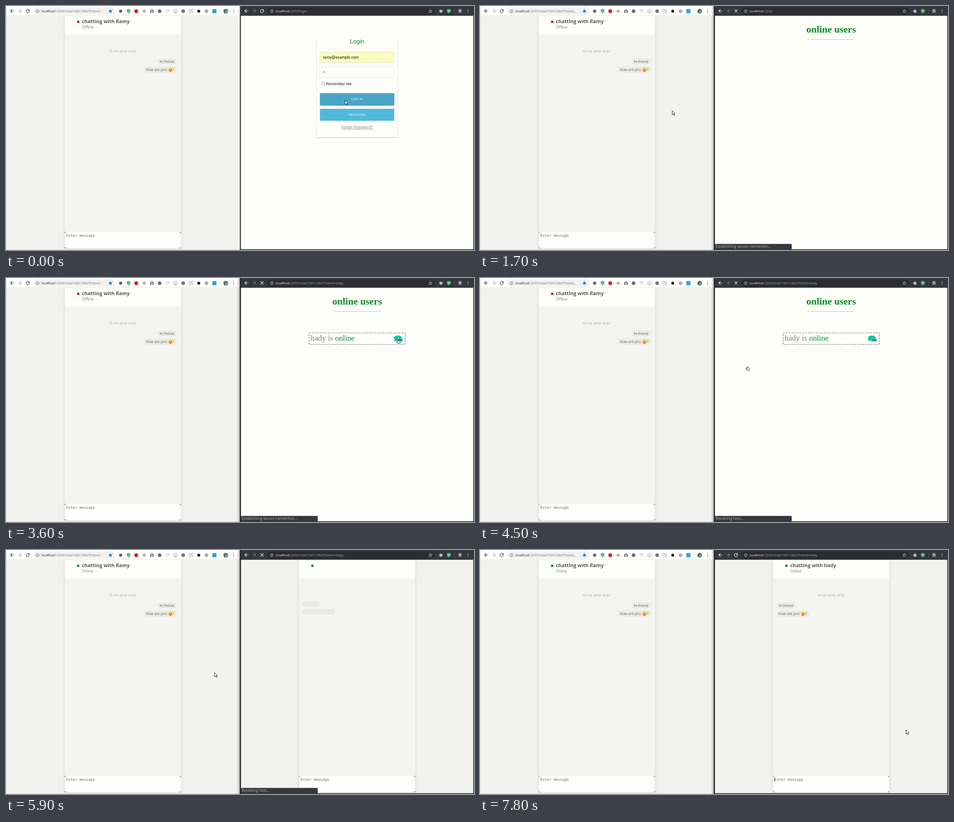
Write an HTML page that moves like this. It is 1033x542 px and loops after 8 s.

```html
<!DOCTYPE html>
<html lang="en">
<head>
<meta charset="utf-8">
<title>Two-window chat</title>
<style>
  html, body { margin: 0; width: 100%; height: 100%; overflow: hidden; background: #fefefb; }
  svg { display: block; width: 100vw; height: 100vh; }
  text { white-space: pre; }
  .ui { font-family: "Noto Sans", sans-serif; }
  .open { font-family: "Open Sans", sans-serif; }
  .sans { font-family: "Liberation Sans", Arial, sans-serif; }
  .serif { font-family: "Liberation Serif", serif; }
  .mono { font-family: "DejaVu Sans Mono", monospace; }
  .panel { filter: drop-shadow(0 0 4px #0000001a); }
  .card { filter: drop-shadow(0 1px 1px #0004); }
  .line { fill: none; stroke-linecap: round; stroke-linejoin: round; }
</style>
</head>
<body>
<svg id="stage" viewBox="0 0 1033 542"></svg>
<script>
const PAPER = '#fefefb', GREEN = '#0c8a25', RED = '#cb1528';

const rect = (x, y, w, h, fill, extra = '') =>
  `<rect x="${x}" y="${y}" width="${w}" height="${h}" fill="${fill}" ${extra}/>`;
const circle = (x, y, r, fill, extra = '') =>
  `<circle cx="${x}" cy="${y}" r="${r}" fill="${fill}" ${extra}/>`;
const text = (x, y, size, font, fill, content, extra = '') =>
  `<text x="${x}" y="${y}" font-size="${size}" class="${font}" fill="${fill}" ${extra}>${content}</text>`;
const line = (d, color, width = 1, extra = '') =>
  `<path class="line" d="${d}" stroke="${color}" stroke-width="${width}" ${extra}/>`;
const group = (id, content, extra = '') => `<g id="${id}" ${extra}>${content}</g>`;
const middle = 'text-anchor="middle"';

const shield = (x, fill) =>
  `<path d="M${x - 4} 8L${x} 6.5 ${x + 4} 8V11Q${x + 4} 14 ${x} 16 ${x - 4} 14 ${x - 4} 11Z" fill="${fill}"/>` +
  line(`M${x - 1.8} 10.8L${x - .3} 12.2 ${x + 2} 9.5`, '#fff', .9);
const star = (x, fill, stroke) => {
  const points = Array.from({ length: 10 }, (_, i) => {
    const a = i * Math.PI / 5, r = i % 2 ? 1.8 : 4;
    return `${x + r * Math.sin(a)},${11.5 - r * Math.cos(a)}`;
  });
  return `<polygon points="${points.join(' ')}" fill="${fill}" stroke="${stroke}" stroke-width=".8"/>`;
};
const menu = (x, fill) => [8, 11, 14].map(y => circle(x, y, .85, fill)).join('');
const reload = (x, color) =>
  line(`M${x + 2.6} 9A3.5 3.5 0 1 0 ${x + 3.4} 12`, color, 1.2) +
  `<path d="M${x + 4} 7V10.7H${x + .4}Z" fill="${color}"/>`;
const navigation = (x, color, faded) =>
  line(`M${x + 4} 11H${x - 3.5}M${x} 7.5L${x - 3.5} 11 ${x} 14.5`, color, 1.2) +
  line(`M${x + 13} 11H${x + 20.5}M${x + 17} 7.5L${x + 20.5} 11 ${x + 17} 14.5`, faded, 1.2);
const info = (x, color) => circle(x, 11.5, 3.3, 'none', `stroke="${color}" stroke-width=".9"`) +
  line(`M${x} 11.2V13M${x} 9.7V9.8`, color, .9);

function leftBar() {
  const dot = (x, fill, r = 3.6) => circle(x, 11.5, r, fill);
  const ring = x => circle(x, 11.5, 4, 'none', 'stroke="#999" stroke-width=".9"');
  return rect(0, 0, 516, 21.5, PAPER) + rect(0, 21, 516, .7, '#dededb') +
    navigation(13.5, '#454545', '#b8b8b6') + reload(48, '#454545') +
    rect(60, 3, 181, 16.5, '#f1f2ee', 'rx="8.2"') + info(69.5, '#666') +
    text(78, 14, 7.4, 'ui', '#777', '<tspan fill="#303030">localhost</tspan>:3333/chat/10011002?friend…') +
    star(230.5, '#1b80d8', '#1b80d8') +
    dot(253, '#686868') + shield(270.5, '#45b96b') + dot(287.5, '#d3202c', 4.3) +
    dot(305, '#b5b5b3') +
    rect(318, 9, 8.5, 6, '#888', 'rx="1"') + rect(320.5, 7.5, 3.5, 2, '#888') + circle(322.2, 12, 1.6, '#ddd') +
    dot(339, '#707070', 4) + line('M353 9L355 8 356.5 9.5 358 8 360 9 360 11 356.5 14.5 353 11Z', '#999', .8) +
    ring(374) + text(374, 13.5, 5.5, 'ui', '#888', '{}', middle) +
    circle(391, 11.5, 3.2, '#555', 'stroke="#555" stroke-width="1.8" stroke-dasharray="1.5 1"') + circle(391, 11.5, 1.2, '#ddd') +
    rect(404, 7.5, 8.5, 8, '#e6e6e3', 'stroke="#bbb" stroke-width=".6"') + line('M404 10H412.5M404 12.7H412.5', '#bbb', .5) +
    dot(425.5, '#181818', 3.2) + dot(442.5, '#aaa', 4) + rect(455.5, 7, 9, 9, '#26a3df') +
    rect(473, 6, .7, 11, '#ccc') + dot(485, '#527b5d', 5.3) + circle(487, 13, 2.6, '#8fa28b') + menu(502.5, '#444');
}

function rightBar() {
  return rect(517, 0, 516, 21.7, '#35383b') +
    rect(577, 3, 370, 16.5, '#2a2c2f', 'rx="8.2"') + navigation(530.5, '#e5e5e5', '#777b7e') +
    group('reload', reload(565, '#e5e5e5')) + group('stop', line('M562 8L568 14M568 8L562 14', '#eee', 1.2)) +
    info(586.5, '#d0d0d0') +
    text(595, 14, 7.4, 'ui', '#999da0', '<tspan fill="#dededb">localhost</tspan>:3333<tspan id="path"></tspan>') +
    star(937, 'none', '#ddd') + circle(960, 11.5, 3.6, '#b9bbbd') +
    shield(977.5, '#888') + group('shield', shield(977.5, '#45b96b')) + rect(990, 6, .7, 11, '#666') +
    line('M999 10.5H1005M1000 8H1004', '#ddd', 1.5) +
    circle(1000.2, 13.4, 1.3, 'none', 'stroke="#ddd"') + circle(1003.8, 13.4, 1.3, 'none', 'stroke="#ddd"') +
    menu(1020, '#ddd');
}

const emoji = (x, y) => circle(x, y, 4.6, '#f8c72f') +
  circle(x - 1.6, y - 1.3, .75, '#5b4018') + circle(x + 1.6, y - 1.3, .75, '#5b4018') +
  `<path d="M${x - 3} ${y + .4}H${x + 3}Q${x + 2.4} ${y + 3.4} ${x} ${y + 3.4} ${x - 2.4} ${y + 3.4} ${x - 3} ${y + .4}Z" fill="#5b4018"/>` +
  rect(x - 2.4, y + .5, 4.8, 1, '#fff');
const bubble = (x, y, w, h = 13.2) => rect(x, y, w, h, '#e9e9e5', 'rx="6.5"');

function chat(left, id, friend, firstX, secondX) {
  return rect(left - 130, 21.7, 516, 520, '#f2f2ee') +
    rect(left, 22, 256, 516, '#f4f4f0', 'class="panel"') + rect(left, 21.7, 256, 41.5, PAPER) +
    rect(left, 502, 256, 36, '#6a6a68') + rect(left, 502, 256, 36, PAPER, 'rx="4.5"') +
    text(left + 3, 513, 8.05, 'mono', '#757575', 'Enter message') +
    `<circle id="${id}Dot" cx="${left + 29.3}" cy="35" r="2.8"/>` +
    group(id + 'Bars', bubble(firstX, 113.8, 38.5, 12.5) + bubble(firstX, 130.5, 70.5, 12.5)) +
    group(id + 'Text',
      text(left + 37.5, 38, 10.8, 'open', '#555750', 'chatting with ' + friend, 'font-weight="700"') +
      text(left + 37.5, 50, 8.2, 'open', '#7b7c78', '', `id="${id}State"`) +
      text(left + 127, 103, 7.3, 'open', '#a2a3a0', '18 Oct 2018 18:52', middle) +
      bubble(firstX, 116.5, 41) + text(firstX + 4.7, 126, 8, 'open', '#5c5d59', 'hi friend') +
      bubble(secondX, 134.8, 71.5) + text(secondX + 4.3, 144.4, 8, 'open', '#5c5d59', 'how are you') +
      emoji(secondX + 58, 141.7) + text(secondX + 63, 144.4, 8, 'open', '#5c5d59', '?'));
}

function login() {
  const field = (y, fill) => rect(693, y, 164, 23.8, fill, 'rx="2" stroke="#dcdcd9" stroke-width=".8"');
  return rect(686, 69, 178, 222.5, PAPER, 'class="card"') + rect(680, 62, 190, 9, PAPER) +
    text(775, 83, 13.1, 'sans', GREEN, 'Login', middle) + rect(693, 95, 164, .6, '#e8e8e5') +
    field(102, '#f9fdbd') + text(699.5, 116.5, 8.6, 'sans', '#111', 'ramy@example.com') +
    field(134.8, PAPER) + circle(701.2, 146.8, 1.3, '#333') +
    rect(697.3, 169.6, 6, 6, '#f0f0ee', 'rx=".8" stroke="#999" stroke-width=".8"') +
    group('check', line('M698.4 172.5L700 174.4 702.6 170.6', '#222', 1.2)) +
    text(706.4, 176, 8.55, 'sans', '#222', 'Remember Me') +
    rect(693, 193.7, 164, 27, '#50b9da', 'rx="2"') +
    group('hover', rect(693, 193.7, 164, 27, '#4aa5c4', 'rx="2" class="card"')) +
    text(775, 209.2, 7.6, 'sans', '#e9f6fa', 'LOG IN', middle) +
    rect(693, 228.3, 164, 26.6, '#50b9da') + text(775, 243.6, 7.55, 'sans', '#e9f6fa', 'REGISTER', middle) +
    text(775, 272, 8.6, 'sans', '#888986', 'Forgot Password?', middle + ' text-decoration="underline"');
}

function users() {
  return text(775, 59, 21.55, 'serif', GREEN, 'online users', middle + ' font-weight="700"') +
    rect(723, 73.5, 104, 1, '#b9bab7') +
    group('friendCard',
      rect(669, 122, 212, 25.5, 'none', 'stroke="#747572" stroke-width="1.2" stroke-dasharray="4 2"') +
      text(672.5, 138.5, 17.3, 'serif', '#7c7d7a', `hady is <tspan fill="${GREEN}">online</tspan>`) +
      '<path d="M858 137Q856 135.5 856 133.7A9 6 0 0 1 874 133.7 9 6 0 0 1 861 139.2Q859 140.8 856.5 140.8 858 139 858 137Z" fill="#14c58e"/>' +
      '<path d="M863.5 137.3A6.3 4 0 0 1 876 137.3Q876 138.5 875 139.5 875 141 876.3 142 873.8 142 872.6 141 863.8 142 863.5 137.3Z" fill="#1c9fb8" stroke="#fefefb" stroke-width=".5"/>');
}

const cursors =
  group('arrow', '<path d="M.4.4V9.8L2.6 7.8 4.2 11.1 5.7 10.4 4.2 7.2H6.9Z" fill="#fff" stroke="#111" stroke-width=".9"/>') +
  group('hand', '<path d="M-2.3 -3.6Q-1.4 -4.4 -.8 -3.4L-.1 -1.5 3.2 -1Q4.2 -.7 4.2 .5L3.8 3.9H-1.8L-4.1 .8Q-4.2 -.3 -3 0L-1.5 .7Z" fill="#fff" stroke="#111" stroke-width=".9" stroke-linejoin="round"/>') +
  group('beam', line('M-2 -5Q0 -5 0 -4 0 -5 2 -5M0 -4V4M-2 5Q0 5 0 4 0 5 2 5', '#222', 1));

document.getElementById('stage').innerHTML =
  '<defs><linearGradient id="edge"><stop stop-opacity="0"/><stop offset="1" stop-opacity=".25"/></linearGradient></defs>' +
  chat(130, 'mine', 'Ramy', 335, 305) + leftBar() +
  rect(0, 0, 1, 542, '#dededb') + rect(0, 541, 516, 1, '#c9cac7') +
  rect(517, 21.7, 516, 520.3, PAPER) + group('login', login()) + group('users', users()) +
  group('room', chat(647, 'room', 'hady', 655, 655) + group('caret', rect(650, 505.7, .9, 9.5, '#222'))) +
  rightBar() +
  group('status', rect(518, 528.5, 170, 13, '#35373b', 'rx="1.5"') + text(520, 537.3, 8.05, 'ui', '#aaaead', '', 'id="statusText"')) +
  rect(516, 0, 2.6, 542, '#4b4c4d') + rect(1031.3, 0, 1.7, 542, '#3a3b3c') + rect(517, 540.2, 516, 1.8, '#3a3b3c') +
  group('focus', rect(510, 0, 6, 542, 'url(#edge)') + rect(516, 0, 2.2, 542, '#242526')) +
  group('cursor', cursors);

const el = {};
for (const node of document.querySelectorAll('[id]')) el[node.id] = node;
const show = (id, on) => { el[id].style.display = on ? '' : 'none'; };
const label = (id, value) => { if (el[id].textContent !== value) el[id].textContent = value; };

// Time, x, y: the pointer rests wherever neighbouring positions agree.
const pointer = [
  [0, 748, 209], [200, 748, 209], [500, 735, 183], [600, 735, 183], [800, 699, 172], [900, 699, 172],
  [1100, 744, 205], [1400, 744, 205], [1700, 424, 232], [1900, 424, 232], [2800, 850, 168],
  [3000, 859, 158], [3200, 866, 141], [3700, 866, 141], [4200, 589, 199], [4400, 589, 199],
  [4500, 591, 201], [4800, 319, 151], [5000, 319, 151], [5200, 10, 12], [5300, 14, 12], [5400, 14, 12],
  [5900, 460, 272], [6000, 460, 272], [6200, 590, 379], [6300, 590, 379], [6800, 762, 535],
  [7000, 762, 535], [7300, 762, 531], [7400, 762, 531], [7800, 940, 399], [8000, 940, 399]
];
function pointerAt(t) {
  const i = Math.max(1, pointer.findIndex(p => p[0] >= t));
  const [t0, x0, y0] = pointer[i - 1], [t1, x1, y1] = pointer[i];
  const k = (t - t0) / (t1 - t0);
  return [x0 + (x1 - x0) * k, y0 + (y1 - y0) * k];
}

function draw(now) {
  const t = Math.floor(now % 8000 / 100) * 100;
  const during = (from, to) => t >= from && t < to;
  const [x, y] = pointerAt(t);

  const friendOnline = during(2500, 3600) || t >= 5700;
  el.mineDot.setAttribute('fill', friendOnline ? GREEN : RED);
  label('mineState', friendOnline ? 'Online' : 'Offline');
  show('mineBars', false);

  show('login', t < 1600);
  show('check', t >= 800);
  show('hover', x > 693 && x < 857 && y > 193 && y < 221);
  show('users', during(1600, 5200));
  show('friendCard', t >= 2600);

  const ready = t >= 6100;
  show('room', t >= 5200);
  show('roomText', ready);
  show('roomBars', !ready);
  el.roomDot.setAttribute('fill', GREEN);
  label('roomState', 'Online');
  show('caret', t >= 7500);

  const loading = during(1500, 2400) || during(3400, 6200);
  show('stop', loading);
  show('reload', !loading);
  show('shield', t !== 1600 && t !== 3500);
  show('focus', t >= 700);
  label('path', t < 1600 ? '/login' : t < 3500 ? '' : '/chat/10011002?friend=hady');
  show('status', during(1600, 2400) || during(3400, 6500));
  label('statusText', during(4000, 5200) || during(5700, 6100) ? 'Resolving host…' : 'Establishing secure connection…');

  const hand = during(1000, 1500) || during(3100, 4700);
  const beam = during(6700, 7600);
  show('hand', hand);
  show('beam', beam);
  show('arrow', !hand && !beam);
  el.cursor.setAttribute('transform', `translate(${x} ${y})`);
}

const start = performance.now();
function tick() {
  draw(performance.now() - start);
  requestAnimationFrame(tick);
}
tick();
</script>
</body>
</html>
```
